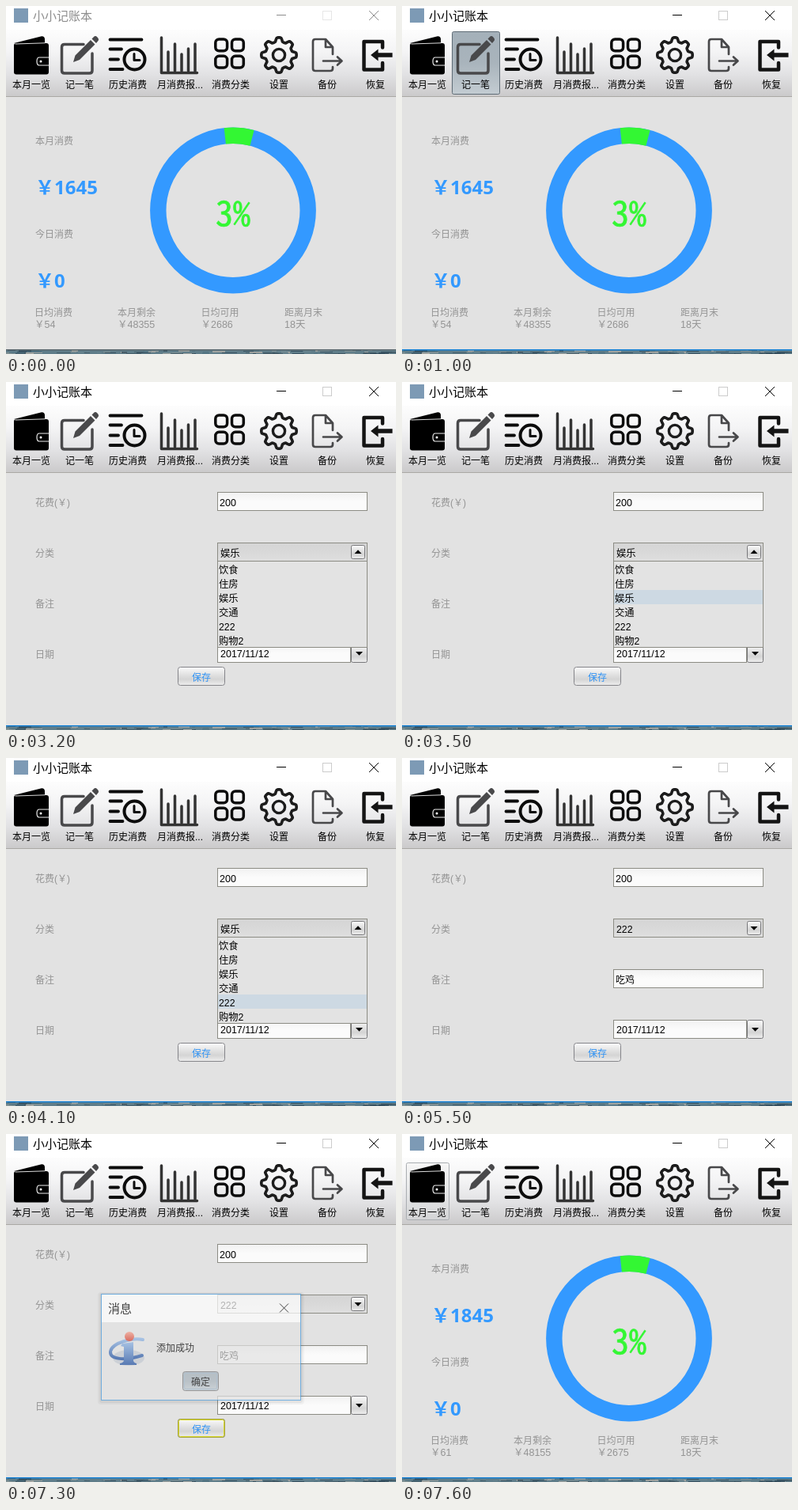
These frames come from a looping animation (493 by 440 pixels, 8 s). An HTML page:

```html
<!DOCTYPE html>
<html lang="zh">
<head>
<meta charset="utf-8">
<style>
html, body { margin: 0; width: 100%; height: 100%; overflow: hidden; background: #e2e2e2; }
svg { display: block; width: 493px; height: 440px; }
text { font-family: "Liberation Sans", "Noto Sans CJK SC", "Noto Sans CJK", sans-serif; white-space: pre; }
.big { font-family: "Noto Sans", "Noto Sans CJK SC", "Noto Sans CJK", sans-serif; font-weight: 700; }
.mono { font-family: "Noto Sans Mono CJK SC", "Noto Sans Mono", monospace; }
.line { fill: none; stroke-linecap: round; stroke-linejoin: round; }
</style>
</head>
<body>
<svg id="stage" viewBox="0 0 493 440" xmlns="http://www.w3.org/2000/svg"></svg>
<script>
const LOOP = 8000;
const GRAY = '#949494', BLUE = '#3399ff', GREEN = '#33f733';
const stage = document.getElementById('stage');

const label = (x, y, str, fill = '#000', size = 12, extra = '') =>
  `<text x="${x}" y="${y}" font-size="${size}" fill="${fill}" ${extra}>${str}</text>`;
const box = (x, y, w, h, fill, stroke = 'none', rx = 0, extra = '') =>
  `<rect x="${x}" y="${y}" width="${w}" height="${h}" fill="${fill}" stroke="${stroke}" rx="${rx}" ${extra}/>`;
const line = (d, stroke, width, extra = '') =>
  `<path class="line" d="${d}" stroke="${stroke}" stroke-width="${width}" ${extra}/>`;
const group = (id, body) => `<g id="${id}">${body}</g>`;
const grad = (id, colors) =>
  `<linearGradient id="${id}" x2="0" y2="1">` +
  colors.map((c, i) => `<stop offset="${i / (colors.length - 1)}" stop-color="${c}"/>`).join('') +
  '</linearGradient>';

const defs = `<defs>
${grad('bar', ['#fdfdfd', '#f4f4f5', '#e2e2e4', '#cbcacb'])}
${grad('button', ['#fbfbfb', '#e6e6e6', '#d4d4d4', '#eeeeee'])}
${grad('combo', ['#d4d4d4', '#dedede'])}
${grad('field', ['#f1f1f1', '#fbfbfb', '#fbfbfb'])}
${grad('hover', ['#f4f6f7', '#e0e4e7', '#cfd4d8'])}
${grad('press', ['#a4b0b9', '#a9b4bc', '#c3ccd2'])}
${grad('focus', ['#f6f6f6', '#e6e7e8', '#d3d4d6'])}
${grad('sphere', ['#f4a08c', '#d43a2a'])}
${grad('ink', ['#8db4e4', '#1f4fa0'])}
</defs>`;

function gear(cx, cy) {
  let d = '';
  for (let i = 0; i < 96; i++) {
    const a = i / 96 * Math.PI * 2;
    const r = 19.6 + 2.6 * Math.tanh(2.4 * Math.cos(8 * a));
    d += `${i ? 'L' : 'M'}${(cx + r * Math.sin(a)).toFixed(1)} ${(cy - r * Math.cos(a)).toFixed(1)}`;
  }
  return line(d + 'Z', '#1c1c1c', 3.6) +
    `<circle cx="${cx}" cy="${cy}" r="7.6" fill="none" stroke="#1c1c1c" stroke-width="3.4"/>`;
}

// Strip of rocky shoreline seen below the window.
function shore() {
  const tones = ['#4f7280', '#2b4656', '#8b9797', '#b4b0a8', '#67858f', '#3c5560'];
  let seed = 7;
  const rand = () => (seed = seed * 16807 % 2147483647) / 2147483647;
  let out = box(0, 434, 493, 6, '#5f7d89');
  for (let i = 0; i < 90; i++) {
    out += box(Math.floor(rand() * 490), 435 + Math.floor(rand() * 5), 4 + Math.floor(rand() * 16), 1 + Math.floor(rand() * 2),
      tones[Math.floor(rand() * tones.length)], 'none', 0, 'opacity=".75"');
  }
  return out;
}

function icons() {
  const wallet = '<path d="M10 47L45 38.200Q49 38 49 42V47Z"/>' + box(10, 47, 44, 39.5, '#000', 'none', 3) +
    line('M12 48L49 46.8', '#ddd', 1) +
    line('M54 65H42Q39 65 39 70T42 75H54', '#eee', 1.2) + '<circle cx="44" cy="70" r="1.5" fill="#fff"/>';
  const edit = line('M98 48.500H74Q70.500 48.500 70.500 52V81.500Q70.500 85 74 85H105.500Q109 85 109 81.500V60', '#49494b', 3.5) +
    '<path d="M85 71L87.500 62.500L107 43L112.500 48.500L93 68ZM108.500 41.500L111 39Q113 37 115.500 39.500T116.500 44L114 47Z" fill="#49494b"/>';
  const history = line('M131.500 42.500H171.500M131.500 54.500H146M131.500 67.500H142M131.500 80H147.500', '#0c0c0c', 3.8) +
    '<circle cx="162.500" cy="67.500" r="13" fill="none" stroke="#0c0c0c" stroke-width="4"/>' +
    line('M162 60.500V68.500H169', '#0c0c0c', 3);
  const chart = line('M196.500 40V84.500H241.500M205 58V82M213.500 48V82M222 61V82M230.500 54V82M239 48V82', '#333', 3.5);
  const tiles = [264.8, 285.5].map(x => [42, 63.3].map(y =>
    box(x, y, 14.8, 14.8, 'none', '#0c0c0c', 4.5, 'stroke-width="3.5"')).join('')).join('');
  const backup = line('M413 77V79Q413 82 410 82H391Q388 82 388 79V45Q388 42 391 42H404L413 52V61M404 43V52H412M401 69.500H424M419 64.500L424.500 69.500L419 74.500', '#48484a', 2.7);
  const restore = line('M476 52.500V45H452.500V80.500H476V72', '#141414', 4.5) +
    '<path d="M461 62L470.500 54.500V59.300H488.500V64.700H470.500V69.500Z" fill="#141414"/>';
  const names = [[8, '本月一览'], [75, '记一笔'], [130, '历史消费'], [191, '月消费报...'],
    [260, '消费分类'], [333, '设置'], [394, '备份'], [455, '恢复']];
  return wallet + edit + history + chart + tiles + gear(345, 62) + backup + restore +
    names.map(([x, s]) => label(x, 103.5, s)).join('');
}

const windowBar = box(0, 0, 493, 31, '#fff') + box(10, 3, 18, 18, '#7d9ab5') +
  label(34, 18, '小小记账本', '#000', 15, 'id="title"') +
  box(400.5, 6.5, 11, 11, 'none', '#ccc', 0, 'id="max"') +
  '<path id="controls" d="M342 11.500H354M459 6L471 18M471 6L459 18" fill="none" stroke="#000"/>';

const toolbar = box(0, 30, 493, 84, 'url(#bar)') + box(0, 114, 493, 1, '#aaa8a4') +
  box(63.5, 32.5, 60, 79, 'url(#hover)', '#8d979f', 2, 'id="newBg"') +
  box(5.5, 36.5, 54, 72, 'url(#focus)', '#a9adb1', 2, 'id="homeBg"') + icons();

function ring() {
  const point = deg => {
    const a = deg * Math.PI / 180;
    return `${287 + 94.7 * Math.sin(a)} ${258.5 - 94.7 * Math.cos(a)}`;
  };
  return `<circle cx="287" cy="258.5" r="94.7" fill="none" stroke="${BLUE}" stroke-width="20.4"/>` +
    `<path d="M${point(-6.2)}A94.7 94.7 0 0 1 ${point(14.7)}" fill="none" stroke="${GREEN}" stroke-width="20.4"/>` +
    label(265, 277.5, '3%', GREEN, 44, `class="mono" stroke="${GREEN}" stroke-width=".7"`);
}

const stat = (x, name, id) => label(x, 391.5, name, GRAY) + label(x, 407, '', GRAY, 12.5, `id="${id}"`);
const overview = label(37, 175, '本月消费', GRAY) + label(37, 293, '今日消费', GRAY) +
  label(37, 238, '', BLUE, 24, 'class="big" id="spent"') +
  label(37, 356, '￥0', BLUE, 24, 'class="big"') + ring() +
  stat(36, '日均消费', 'daily') + stat(141, '本月剩余', 'left') +
  stat(246.5, '日均可用', 'quota') + stat(352, '距离月末', 'days');

const arrow = (x, y, dir) => `<path d="M${x - 4.5} ${y - 2 * dir}H${x + 4.5}L${x} ${y + 2.8 * dir}Z"/>`;
const kinds = ['饮食', '住房', '娱乐', '交通', '222', '购物2'];
const input = (y, w = 189) => box(267.5, y + .5, w, 23, 'url(#field)', '#8c8c84');

const form = ['花费(￥)', '分类', '备注', '日期'].map((s, i) => label(37, 157 + 64 * i, s, GRAY)).join('') +
  input(139) + label(270, 156.5, '', '#000', 12.5, 'id="amount"') +
  box(267.5, 203.5, 189, 23, 'url(#combo)', '#8c8c84') +
  label(271, 220.5, '', '#000', 12.3, 'id="kind"') +
  box(436.5, 206.5, 17, 17, 'url(#button)', '#77777a', 2) +
  group('down', arrow(445, 215, 1)) + group('up', arrow(445, 215, -1)) +
  input(267) + label(270, 284.5, '吃鸡', '#000', 12, 'id="note"') +
  input(331, 168) + label(271, 348, '2017/11/12', '#000', 12.5) +
  box(436.5, 331.5, 20, 23, 'url(#button)', '#77777a', 2) + arrow(446.5, 343, 1) +
  box(217.5, 360.5, 59, 23, 'url(#button)', '#85858a', 3) +
  group('armed', box(217.5, 360.5, 59, 23, 'none', '#a3a243', 3) + box(218.5, 361.5, 57, 21, 'none', '#d9d92a', 2)) +
  label(235, 377.5, '保存', '#2f93f5') +
  box(270, 143, 1, 16, '#000', 'none', 0, 'id="caret"') +
  group('popup', box(267.5, 226.5, 189, 109, '#e3e3e3', '#8c8c84') +
    box(268, 0, 188, 18, '#cdd9e3', 'none', 0, 'id="pick"') +
    kinds.map((s, i) => label(269, 242 + 18 * i, s, '#000', 12.3)).join(''));

const infoIcon = '<ellipse cx="155" cy="283" rx="20" ry="10" fill="#a9b4c4" opacity=".55"/>' +
  line('M173 260C160 257 134 264 132 275C131 285 150 287 172 280', 'url(#ink)', 4) +
  '<path d="M147 265L161 263V286Q161 289 165 290V292H144V290Q149 289 149 286V269L145 268Z" fill="url(#ink)"/>' +
  '<circle cx="156" cy="256" r="6" fill="url(#sphere)"/>';
const dialog = box(116, 200, 261, 142, '#000', 'none', 4, 'opacity=".05"') +
  box(118, 201, 257, 139, '#000', 'none', 3, 'opacity=".07"') +
  box(120.5, 202.5, 252, 134, '#e2e2e2', '#3f96dc') + box(121, 203, 251, 35, '#fff') +
  label(129, 226, '消息', '#000', 15) +
  '<path d="M346 214.500L357 225.500M357 214.500L346 225.500" stroke="#000" fill="none"/>' +
  infoIcon + label(190, 275, '添加成功') +
  box(223.5, 300.5, 45, 24, 'url(#button)', '#77777a', 3, 'id="ok"') +
  box(225.5, 302.5, 41, 20, 'none', '#9bb3c6', 2) + label(234, 318, '确定');

stage.innerHTML = defs + box(0, 0, 493, 440, '#e2e2e2') + windowBar + toolbar +
  group('overview', overview) + group('form', form) +
  shore() + box(0, 434, 493, 1.5, '#1883d7', 'none', 0, 'id="edge"') +
  group('dialog', dialog);

const ui = {};
stage.querySelectorAll('[id]').forEach(el => ui[el.id] = el);
const show = (el, on) => el.style.display = on ? '' : 'none';
const set = (el, attrs) => { for (const k in attrs) el.setAttribute(k, attrs[k]); };
const within = (t, ...spans) => spans.some(([a, b]) => t >= a && t < b);
// Value of the last [time, value] step that has begun.
const step = (t, steps) => steps.reduce((v, [at, next]) => t >= at ? next : v, steps[0][1]);

function draw(t) {
  const active = within(t, [900, 6600], [7300, LOOP]);
  set(ui.title, { fill: active ? '#000' : '#8c8c8c' });
  set(ui.controls, { stroke: active ? '#000' : '#8c8c8c' });
  set(ui.max, { stroke: active ? '#ccc' : '#e6e6e6' });
  set(ui.edge, { fill: active ? '#1883d7' : '#5d6a70' });

  show(ui.newBg, within(t, [500, 1200]));
  const pressed = within(t, [1000, 1100]);
  set(ui.newBg, { fill: pressed ? 'url(#press)' : 'url(#hover)', stroke: pressed ? '#5f6c76' : '#8d979f' });

  const saved = t >= 7400;
  const inForm = t >= 1100 && !saved;
  show(ui.homeBg, saved);
  show(ui.overview, !inForm);
  show(ui.form, inForm);
  ui.spent.textContent = saved ? '￥1845' : '￥1645';
  ui.daily.textContent = saved ? '￥61' : '￥54';
  ui.left.textContent = saved ? '￥48155' : '￥48355';
  ui.quota.textContent = saved ? '￥2675' : '￥2686';
  ui.days.textContent = '18天';

  const typed = step(t, [[0, 0], [2100, 1], [2500, 2], [2700, 3]]);
  ui.amount.textContent = '200'.slice(0, typed);
  ui.kind.textContent = t < 4400 ? kinds[2] : kinds[4];
  show(ui.note, t >= 5100);

  const open = within(t, [3200, 4400]);
  show(ui.popup, open);
  show(ui.up, open);
  show(ui.down, !open);
  const row = step(t, [[0, -1], [3400, 0], [3500, 2], [3700, 3], [4100, 4]]);
  show(ui.pick, row >= 0);
  set(ui.pick, { y: 227 + 18 * Math.max(row, 0) });

  show(ui.caret, within(t, [1200, 1500], [2000, 3200], [4700, 5500], [6000, 6400]));
  set(ui.caret, t < 4700 ? { x: 270 + 7 * typed, y: 143 } : { x: t < 5100 ? 270 : 294, y: 271 });
  show(ui.armed, t >= 5800);

  const alpha = step(t, [[0, 0], [6600, .08], [6700, .25], [6800, .6], [6900, .88], [7000, 1],
    [7300, .7], [7400, .35], [7500, .1], [7600, 0]]);
  show(ui.dialog, alpha > 0);
  set(ui.dialog, { opacity: alpha });
  set(ui.ok, { fill: t >= 7100 ? 'url(#press)' : 'url(#button)' });
}

const start = performance.now();
function tick() {
  draw((performance.now() - start) % LOOP);
  requestAnimationFrame(tick);
}
tick();
</script>
</body>
</html>
```
